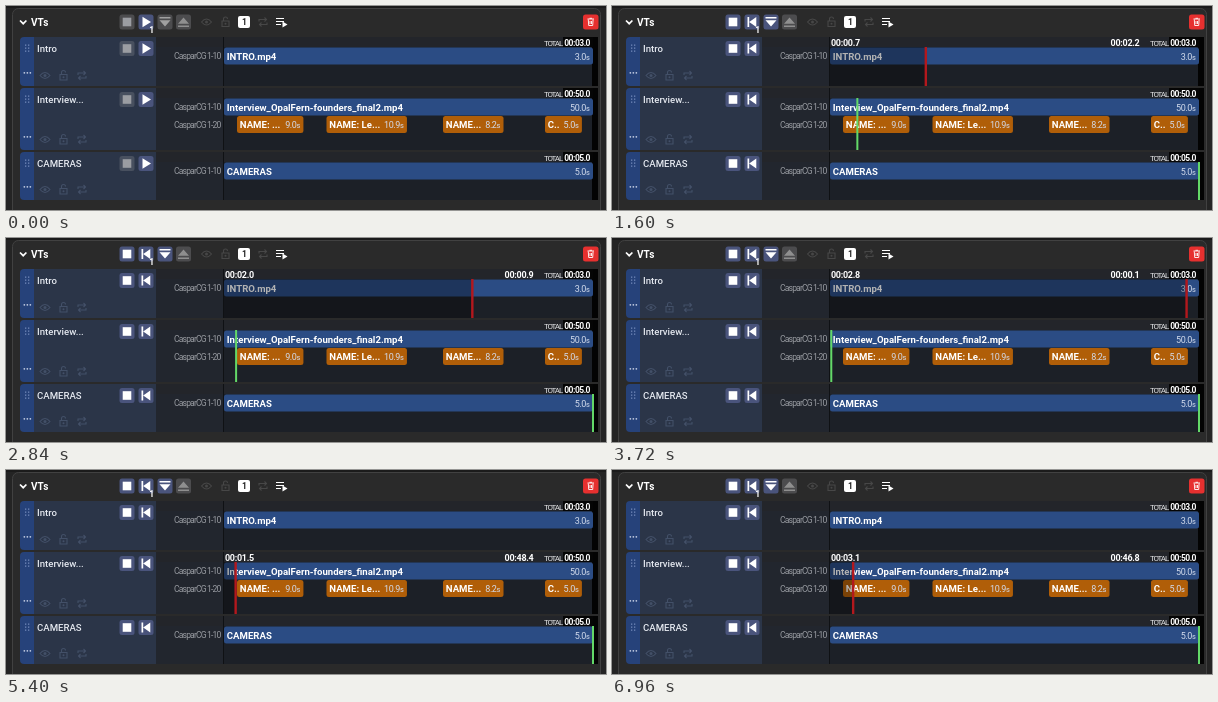
These frames come from a looping animation (600x204 px, 7000 ms). An HTML page:

```html
<!DOCTYPE html>
<html lang="en">
<head>
<meta charset="utf-8">
<style>
  html, body { margin: 0; width: 100%; height: 100%; overflow: hidden; background: #242424; }
  svg { display: block; width: 600px; height: 204px; font-family: Roboto, "Open Sans", sans-serif; }
  .title { font-size: 10px; font-weight: 700; fill: #fff; }
  .name { font-size: 9.6px; font-weight: 500; fill: #e4e8ef; }
  .clip { font-size: 9.6px; font-weight: 600; fill: #fff; }
  .layer { font-size: 8.6px; letter-spacing: -.85px; fill: #999ca2; }
  .dur { font-size: 9px; letter-spacing: -.4px; fill: #d3dced; }
  .unit { font-size: 7.5px; }
  .total { font-size: 8px; letter-spacing: -1.2px; fill: #e0e1e3; }
  .sum { font-size: 8.5px; font-weight: 700; letter-spacing: -.5px; fill: #fff; }
  .clock { font-size: 9px; font-weight: 700; letter-spacing: -.3px; fill: #fff; }
  .line { fill: none; stroke-width: 1.1; }
</style>
</head>
<body>
<svg id="stage" viewBox="0 0 600 204"></svg>
<script>
const LEFT = 218, WIDTH = 369, LOOP = 7000, STEP = 40;
const START = 821, SHOWN = 920, SWITCH = 3824, SWITCH_SHOWN = 3920;
const ROWS = [
  { name: 'Intro', clip: 'INTRO.mp4', y: 31, h: 50, secs: 3 },
  { name: 'Interview...', clip: 'Interview_OpalFern-founders_final2.mp4', y: 82, h: 63, secs: 50,
    titles: [[231, 9, 'NAME: ...'], [320.5, 10.9, 'NAME: Le...'], [437, 8.2, 'NAME...'], [539, 5, 'C..']] },
  { name: 'CAMERAS', clip: 'CAMERAS', y: 146, h: 49, secs: 5 }
];
const GLYPHS = {
  stop: '<rect x="-4.3" y="-4.3" width="8.6" height="8.6"/>',
  play: '<path d="M-3.5-5.2 5 0-3.5 5.2z"/>',
  back: '<path d="M-4.5-5h1.7V5h-1.7zM4.3-5V5L-2.8 0z"/>',
  down: '<path d="M-5.5-5h11v1.6h-11zM-5.5-1.8h11L0 4.5z"/>',
  up: '<path d="M-5.5 5h11V3.4h-11zM-5.5 1.8h11L0-4.5z"/>',
  eye: '<path class="line" d="M-5 0Q0-6 5 0Q0 6-5 0z"/><circle r="1.5"/>',
  lock: '<path class="line" d="M-3.5-1h7v5.5h-7zM-2-1v-2a2 2 0 0 1 4 0"/><circle cy="1.8" r="1"/>',
  loop: '<path class="line" d="M-4-.5v-2h7M1.5-4.5l2 2-2 2M4 .5v2h-7M-1.5 .5l-2 2 2 2"/>'
};

const rect = (x, y, w, h, fill, r = 0, more = '') =>
  `<rect x="${x}" y="${y}" width="${w}" height="${h}" rx="${r}" fill="${fill}" ${more}/>`;
const text = (x, y, cls, str, anchor = 'start', more = '') =>
  `<text x="${x}" y="${y}" class="${cls}" text-anchor="${anchor}" ${more}>${str}</text>`;
const icon = (kind, x, y, color) =>
  `<g transform="translate(${x} ${y})" fill="${color}" stroke="${color}" stroke-width="0">${GLYPHS[kind]}</g>`;
const button = (kind, x, y, bg, color) =>
  rect(x - 7.5, y - 7.5, 15, 15, bg, 2.5) + icon(kind, x, y, color);
const clip = (x, y, w, label, secs, fill) =>
  rect(x, y, w, 17, fill, 2.5) + text(x + 2.8, y + 12.3, 'clip', label) +
  text(x + w - 3.5, y + 12.2, 'dur', `${secs.toFixed(1)}<tspan class="unit">s</tspan>`, 'end');
const pad = s => '00:' + (s < 10 ? '0' : '') + s;
const clock = ms => pad((Math.floor(Math.max(ms, 0) / 100) / 10).toFixed(1));

function transport(x, y, idle, playing) {
  const live = '#4a547c';
  return playing
    ? button('stop', x, y, live, '#fff') + button('back', x + 19, y, live, '#fff')
    : button('stop', x, y, idle, '#9b9da2') + button('play', x + 19, y, live, '#fff');
}

function header(playing) {
  return icon('eye', 200.5, 16, '#474747') + icon('lock', 219.5, 16, '#474747') + icon('loop', 257, 16, '#474747') +
    '<path class="line" d="M14 14.5l3.2 3.2 3.2-3.2" stroke="#fff" style="stroke-width:1.7"/>' +
    text(25, 19.7, 'title', 'VTs') +
    transport(121, 16, '#4c4c4e', playing) +
    button('down', 159, 16, playing ? '#4a547c' : '#4c4c4e', playing ? '#fff' : '#a0a0a0') +
    button('up', 177.5, 16, '#4c4c4e', '#8f8f8f') +
    text(145.5, 26.5, 'sum', '1', 'middle') +
    rect(232, 10, 12, 12, '#fff', 2) + text(238.3, 19.2, 'sum', '1', 'middle', 'style="fill:#222"') +
    '<path class="line" d="M270 12.5h8M270 15.5h8M270 18.5h5" stroke="#fff"/><path d="M276.5 15.5l5 3-5 3z" fill="#fff"/>' +
    rect(577, 8.5, 15.5, 15, '#e6302f', 2.5) +
    '<path class="line" d="M581.5 13h6.5M583.5 12.3h2.5M582.3 13.5l.4 6h4l.4-6M584 15v3M585.5 15v3" stroke="#fff" style="stroke-width:.9"/>';
}

function row({ name, clip: label, y, h, secs, titles = [] }, playing) {
  let s = rect(14, y, 20, h - 1, '#26427a', 4) + rect(28, y, 122, h - 1, '#2b3548') +
    rect(150, y, 68, h - 1, '#22262e') + rect(217, y, 370, h - 1, '#1c2027') +
    rect(150, y, 437, 10, '#23252a') + rect(217, y, 1, h - 1, '#0f1114') +
    rect(586, y, 6, h - 1, '#030303') + rect(557, y, 30, 10, '#050505');
  for (let i = 0; i < 6; i++) s += rect(19 + i % 2 * 3, y + 7.5 + (i >> 1) * 3, 1.3, 1.3, '#7187b9');
  for (let i = 0; i < 3; i++) s += rect(17.5 + i * 3, y + h - 15, 1.7, 1.7, '#c2cce2', .8);
  s += text(31, y + 14.7, 'name', name) + transport(121, y + 11.5, '#48505f', playing);
  ['eye', 'lock', 'loop'].forEach((kind, i) => s += icon(kind, 39 + i * 18.5, y + h - 11.5, '#435068'));
  s += text(214.5, y + 22.2, 'layer', 'CasparCG 1-10', 'end') +
    text(556, y + 8.8, 'total', 'TOTAL', 'end') +
    text(584, y + 8.8, 'sum', pad(secs.toFixed(1)), 'end') +
    clip(LEFT, y + 10.5, WIDTH, label, secs, '#2b4c84');
  if (titles.length) s += text(214.5, y + 39.5, 'layer', 'CasparCG 1-20', 'end');
  for (const [x, len, str] of titles) s += clip(x, y + 28, len * WIDTH / 50, str, len, '#b05e08');
  return s;
}

// Playhead with the clocks for elapsed and remaining time
function playhead({ y, h, secs }, ms) {
  const w = Math.min(ms / 1000 / secs, 1) * WIDTH;
  return rect(LEFT, y + 10, w, h - 11, '#000', 0, 'opacity=".3"') +
    rect(LEFT + w - 1.2, y + 10, 2.4, h - 11, '#b3181d') +
    text(219, y + 9, 'clock', clock(ms)) +
    text(527.5, y + 9, 'clock', clock(secs * 1000 - ms), 'end');
}

// Green line closing in on the start of a waiting row; the track spans 30 s
function countdown({ y, h }, ms) {
  const x = LEFT + Math.min(ms / 30000, 1) * WIDTH;
  return rect(x - 1, y + 10, 2, h - 11, '#63d868');
}

const panel = playing => '<path d="M0 0h600v2H0z" fill="#1b1b1b"/>' +
  rect(6.5, 2.5, 588, 210, '#2a2a2a', 6, 'stroke="#414141"') +
  header(playing) + ROWS.map(r => row(r, playing)).join('');
const panels = [panel(false), panel(true)];
const stage = document.getElementById('stage');
stage.innerHTML = '<g id="panel"></g><g id="marks"></g>';
const [base, marks] = stage.children;
let wasPlaying = null;

function draw(now) {
  const t = Math.floor(now % LOOP / STEP) * STEP;
  const playing = t >= SHOWN;
  if (playing !== wasPlaying) base.innerHTML = panels[+playing];
  wasPlaying = playing;
  const [intro, talk, cameras] = ROWS;
  if (!playing) {
    marks.innerHTML = '';
  } else if (t < SWITCH_SHOWN) {
    const at = Math.min(t, 3800);
    marks.innerHTML = playhead(intro, at - START) + countdown(talk, SWITCH - at) + countdown(cameras, 50000 + SWITCH - at);
  } else {
    marks.innerHTML = playhead(talk, t - SWITCH) + countdown(cameras, 50000 + SWITCH - t);
  }
}

const began = performance.now();
function tick() {
  draw(performance.now() - began);
  requestAnimationFrame(tick);
}
tick();
</script>
</body>
</html>
```
